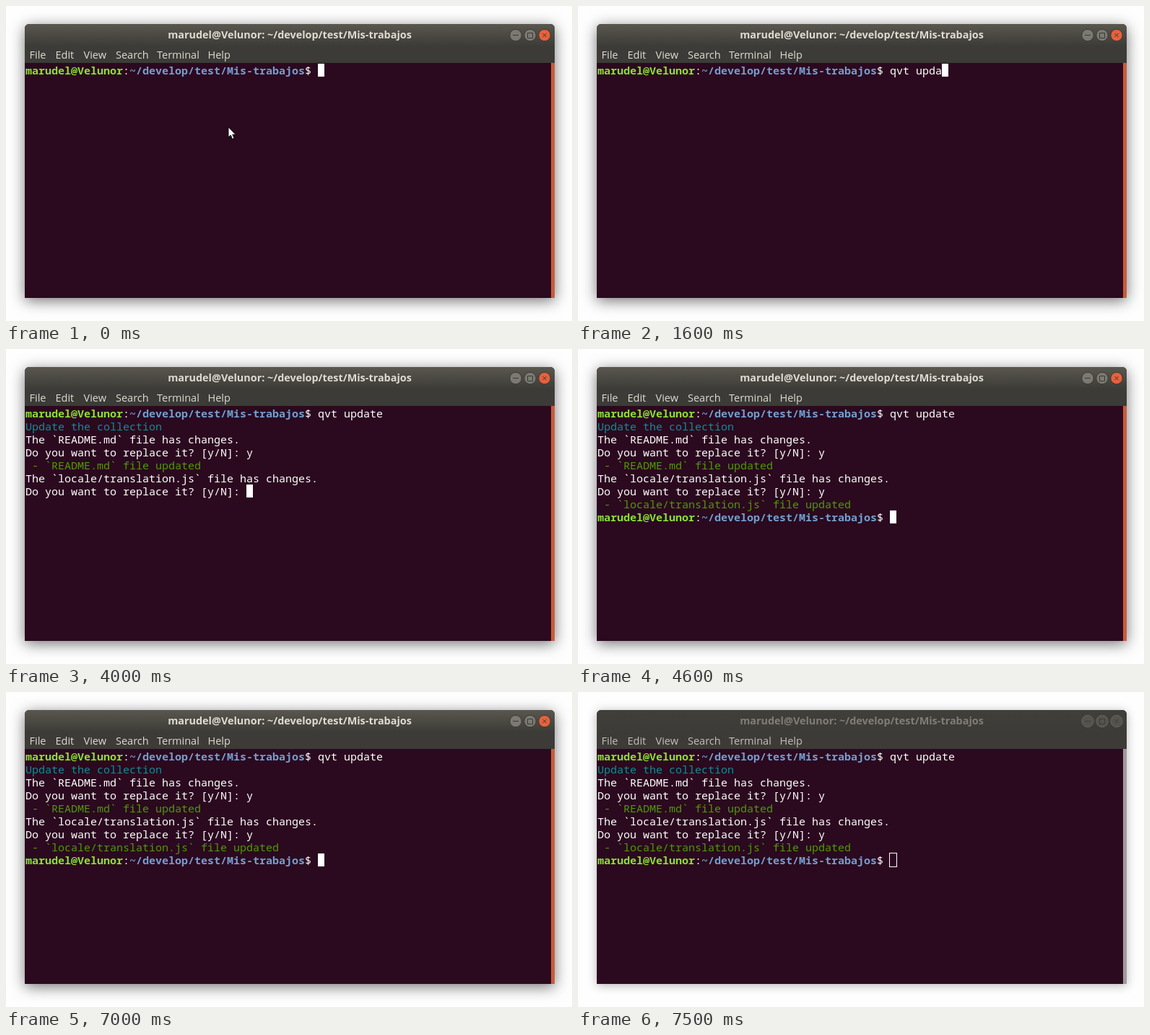
An HTML page with a canvas for the animation above (7600 ms loop, 784 px wide and 437 px high).

```html
<!DOCTYPE html>
<html lang="en">
<head>
<meta charset="utf-8">
<title>Terminal</title>
<style>
  html, body { margin: 0; width: 100%; height: 100%; overflow: hidden; background: #fefefe; }
  canvas { display: block; }
</style>
</head>
<body>
<canvas id="stage" width="784" height="437"></canvas>
<script>
const ctx = document.getElementById('stage').getContext('2d');
const LOOP = 7600, CELL_W = 9, CELL_H = 18, LEFT = 27, TOP = 80;
const USER = 'marudel@Velunor', PATH = '~/develop/test/Mis-trabajos';
const COMMAND = 'qvt update', QUESTION = 'Do you want to replace it? [y/N]: ';
const WHITE = '#ffffff', GREEN = '#4e9a06', CYAN = '#0c8f95';
const PROMPT = [[USER, '#8ae234', 1], [':', WHITE], [PATH, '#729fcf', 1], ['$ ', WHITE]];
const MENU = { File: 32.5, Edit: 68.5, View: 107.5, Search: 152, Terminal: 209, Help: 279.5 };

// [time, value...] steps; each holds until the next one
const typing = [[0, 0], [500, 1], [900, 2], [1100, 4], [1300, 5], [1400, 6], [1600, 8], [1800, 10]];
const blink = [[0, 1], [2800, 0], [3500, 1], [5100, 0], [5700, 1], [6300, 0], [7000, 1]];
const blur = [[0, 0], [7400, 0.5], [7500, 1]];
const pointer = [
  [0, 308, 168], [100, 308, 162], [400], [5800, 306, 161], [5900, 293, 156],
  [6100, 285, 146], [6200, 240, 92], [6300, 190.5, 41], [6400, 165, 26],
  [6500, 132, 12], [6600, 104, 4], [6800]
];
const at = (steps, t) => steps.findLast(s => s[0] <= t).slice(1);

function screenLines(t) {
  const [count] = at(typing, t);
  const lines = [[...PROMPT, [COMMAND.slice(0, count), WHITE]]];
  const ask = (file, start, answer, done) => {
    if (t < start) return;
    lines.push([['The `' + file + '` file has changes.', WHITE]],
               [[QUESTION + (t >= answer ? 'y' : ''), WHITE]]);
    if (t >= done) lines.push([[' - `' + file + '` file updated', GREEN]]);
  };
  if (t >= 2500) lines.push([['Update the collection', CYAN]]);
  ask('README.md', 2500, 3500, 4000);
  ask('locale/translation.js', 4000, 4500, 4600);
  if (t >= 4600) lines.push(PROMPT);
  return lines;
}

function drawScreen(t) {
  const lines = screenLines(t);
  let col = 0;
  ctx.textAlign = 'left';
  lines.forEach((line, row) => {
    col = 0;
    for (const [text, color, bold] of line) {
      ctx.font = (bold ? 'bold ' : '') + '15px "Noto Sans Mono", monospace';
      ctx.fillStyle = color;
      for (const ch of text) ctx.fillText(ch, LEFT + CELL_W * col++, TOP + 15 + CELL_H * row);
    }
  });
  const x = LEFT + CELL_W * col, y = TOP + CELL_H * (lines.length - 1);
  if (t >= 7400) {
    ctx.strokeStyle = WHITE;
    ctx.lineWidth = 1;
    ctx.strokeRect(x - 0.5, y - 0.5, 10, 19);
  } else if (at(blink, t)[0]) {
    ctx.fillStyle = WHITE;
    ctx.fillRect(x, y, CELL_W, CELL_H);
  }
}

function windowShape() {
  ctx.beginPath();
  ctx.roundRect(26, 25, 734, 380, [6, 6, 0, 0]);
}

function drawShadow(focused) {
  ctx.save();
  ctx.shadowColor = focused ? 'rgba(0,0,0,.55)' : 'rgba(0,0,0,.3)';
  ctx.shadowBlur = focused ? 20 : 14;
  ctx.shadowOffsetY = focused ? 4 : 2;
  ctx.fillStyle = '#2b091f';
  windowShape();
  ctx.fill();
  ctx.restore();
}

function drawButton(i, focused) {
  const x = 706 + 20 * i, y = 40.5, close = i === 2;
  ctx.beginPath();
  ctx.arc(x, y, 8.2, 0, 2 * Math.PI);
  ctx.fillStyle = !focused ? '#55534d' : close ? '#e5623c' : '#7b7972';
  ctx.fill();
  ctx.strokeStyle = focused ? '#3a3933' : '#65635d';
  ctx.lineWidth = 1;
  ctx.stroke();
  ctx.beginPath();
  if (i === 0) { ctx.moveTo(x - 4, y); ctx.lineTo(x + 4, y); }
  if (i === 1) ctx.rect(x - 3.5, y - 3, 7, 7);
  if (close) {
    ctx.moveTo(x - 2.5, y - 2.5); ctx.lineTo(x + 2.5, y + 2.5);
    ctx.moveTo(x + 2.5, y - 2.5); ctx.lineTo(x - 2.5, y + 2.5);
  }
  ctx.strokeStyle = focused ? '#3a3933' : '#3c3b37';
  ctx.stroke();
}

function drawChrome(focused) {
  ctx.save();
  windowShape();
  ctx.clip();
  const bar = ctx.createLinearGradient(0, 25, 0, 56);
  bar.addColorStop(0, focused ? '#59574e' : '#403f3a');
  bar.addColorStop(1, '#3c3b37');
  ctx.fillStyle = bar;
  ctx.fillRect(26, 25, 734, 54);
  ctx.fillStyle = focused ? '#c75c39' : '#a0999d';
  ctx.fillRect(755, 79, 5, 326);
  ctx.restore();

  ctx.textAlign = 'center';
  ctx.font = 'bold 14.4px "Open Sans", sans-serif';
  ctx.fillStyle = focused ? '#dfdbd2' : '#807d77';
  ctx.fillText(USER + ': ' + PATH, 393, 45);
  for (let i = 0; i < 3; i++) drawButton(i, focused);

  ctx.textAlign = 'left';
  ctx.font = '14.5px "Open Sans", sans-serif';
  ctx.fillStyle = focused ? '#dfdbd2' : '#c4c0b8';
  for (const name in MENU) ctx.fillText(name, MENU[name], 73);
}

function drawPointer(x, y) {
  ctx.save();
  ctx.translate(x, y);
  ctx.shadowColor = 'rgba(0,0,0,.35)';
  ctx.shadowBlur = 2;
  ctx.shadowOffsetY = 1;
  const arrow = new Path2D('M0 0V14L3.3 11.2L5.5 16.5L8 15.5L5.8 10.4H10Z');
  ctx.fillStyle = WHITE;
  ctx.fill(arrow);
  ctx.shadowColor = 'transparent';
  ctx.strokeStyle = '#111';
  ctx.lineWidth = 1;
  ctx.stroke(arrow);
  ctx.restore();
}

function draw(now) {
  const t = now % LOOP, [fade] = at(blur, t), [px, py] = at(pointer, t);
  ctx.fillStyle = '#fefefe';
  ctx.fillRect(0, 0, 784, 437);
  drawShadow(fade === 0);
  if (fade < 1) drawChrome(true);
  if (fade > 0) {
    ctx.globalAlpha = fade;
    drawChrome(false);
    ctx.globalAlpha = 1;
  }
  drawScreen(t);
  if (px !== undefined) drawPointer(px, py);
}

const start = performance.now();
function tick() {
  draw(performance.now() - start);
  requestAnimationFrame(tick);
}
tick();
</script>
</body>
</html>
```
